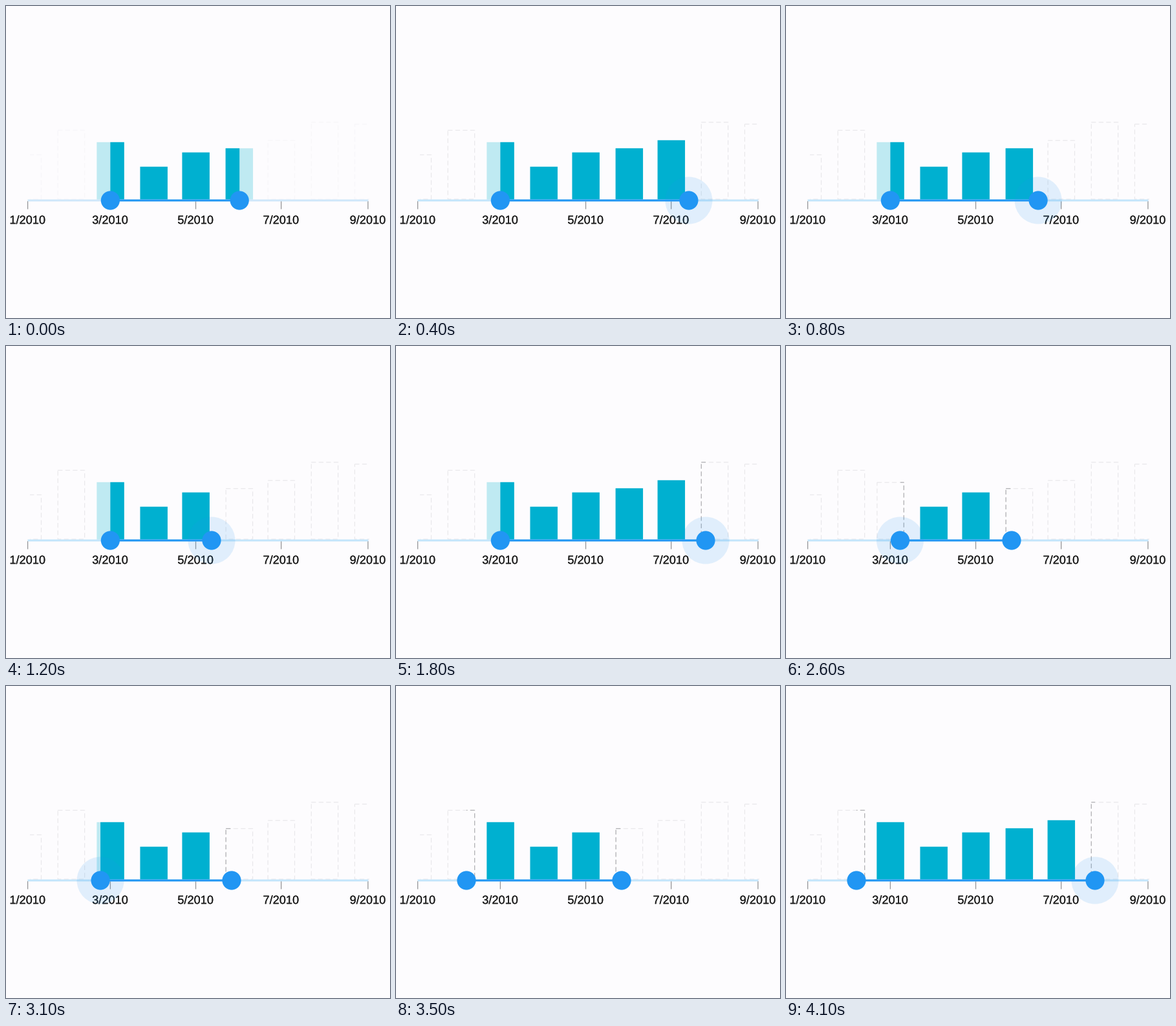
These frames come from a looping animation (594x483 px, 4200 ms). A matplotlib script:

```python
import matplotlib.pyplot as plt
from matplotlib.animation import FuncAnimation
from matplotlib.patches import Circle, Rectangle
from matplotlib.patheffects import withStroke

W, H, DPI = 594, 483, 64
PT = 72 / DPI  # points per pixel
FRAMES, STEP = 42, 100

BACK, BLUE, TEAL, PALE = "#fdfcfe", "#2196f3", "#00b0d0", "#bfeaf2"
TRACK, DASH, DARK_DASH = "#c3e5fb", "#e9e8eb", "#b0b0b3"
AXIS_Y, BASE_Y, BAR_W = 301, 299.7, 42.4

# Bars sit on the first day of each month
MONTH_DAYS = [0, 31, 59, 90, 120, 151, 181, 212, 243]
TOPS = [230, 192, 210.8, 248.8, 226.7, 220.3, 207.8, 179.6, 182.5]
CENTERS = [33.8 + 2.166 * day for day in MONTH_DAYS]

# Drags: first frame, last frame, end position, ease-out power
LEFT_START, RIGHT_START = 161.4, 361.2
LEFT_DRAGS = [(23, 26, 176.5, 1), (26, 29, 212, 1.6), (29, 34, 109, 2)]
RIGHT_DRAGS = [(0, 6, 472, 1.6), (7, 12, 318, 3.4), (12, 18, 479, 1.65),
               (18, 22, 349, 2.3), (36, 41, 478, 1.65)]


def position(frame, start, drags):
    x = start
    for first, last, end, power in drags:
        if frame <= first:
            break
        u = min(1, (frame - first) / (last - first))
        x += (end - x) * (1 - (1 - u) ** power)
    return x


fig = plt.figure(figsize=(W / DPI, H / DPI), dpi=DPI, facecolor=BACK)
ax = fig.add_axes([0, 0, 1, 1])
ax.set(xlim=(0, W), ylim=(H, 0))
ax.axis("off")


def block(color, z):
    return ax.add_patch(Rectangle((0, 0), 0, 0, fc=color, lw=0, zorder=z,
                                  snap=False))


def outline(x, top, color, z):
    return ax.add_patch(Rectangle(
        (x - BAR_W / 2 + 0.5, top + 0.4), BAR_W - 1, BASE_Y - top - 1,
        fill=False, ec=color, lw=1.2 * PT, ls=(0, (6, 3.6)),
        capstyle="butt", zorder=z, snap=False))


def line(x, y, color, width, z):
    return ax.plot(x, y, color=color, lw=width * PT, zorder=z, snap=False,
                   solid_capstyle="butt")[0]


def window(x0, x1):
    return Rectangle((x0, 0), x1 - x0, H, transform=ax.transData)


def dot(radius, z, alpha=1):
    return ax.add_patch(Circle((0, AXIS_Y), radius, fc=BLUE, lw=0,
                               alpha=alpha, zorder=z))


bars = []
for x, top in zip(CENTERS, TOPS):
    light = outline(x, top, DASH, 1)
    light.set_clip_path(window(37, 561.5))
    bars.append((x, top, light, outline(x, top, DARK_DASH, 2),
                 block(PALE, 3), block(TEAL, 4)))

for month, x in zip(range(1, 10, 2), CENTERS[::2]):
    line([x - 0.2, x - 0.2], [302, 314.5], "#969699", 1.3, 5)
    ax.text(x - 0.4, 337.2, f"{month}/2010", family="Liberation Sans",
            size=18.2 * PT, color="#1c1c1c", ha="center", va="baseline",
            zorder=5, path_effects=[withStroke(linewidth=0.2 * PT,
                                               foreground="#1c1c1c")])

track = line([33.5, 560.5], [AXIS_Y] * 2, TRACK, 3, 6)
chosen = line([], [], BLUE, 3, 7)
halo = dot(36.5, 8, 0.13)
left_thumb, right_thumb = dot(14.6, 9), dot(14.6, 9)


def draw(frame):
    lo = position(frame, LEFT_START, LEFT_DRAGS)
    hi = position(frame, RIGHT_START, RIGHT_DRAGS)
    # Outlines and track start out washed out
    first = frame == 0
    track.set_color("#cfe7fa" if first else TRACK)

    for x, top, light, dark, pale, teal in bars:
        x0, x1 = x - BAR_W / 2, x + BAR_W / 2
        filled = lo <= x <= hi
        light.set_edgecolor("#f7f6f9" if first else DASH)
        light.set_visible(not filled)
        dark.set_visible(not filled and x1 > lo and x0 < hi)
        dark.set_clip_path(window(lo, hi))
        pale.set_visible(filled)
        teal.set_visible(filled)
        a, b = max(x0, lo), min(x1, hi)
        pale.set_bounds(x0, top, BAR_W, BASE_Y - top)
        teal.set_bounds(a, top, max(0, b - a), BASE_Y - top)

    chosen.set_data([lo, hi], [AXIS_Y, AXIS_Y])
    left_thumb.center = lo, AXIS_Y
    right_thumb.center = hi, AXIS_Y
    left_held = 24 <= frame <= 34
    right_held = 1 <= frame <= 21 or frame >= 37
    halo.center = (lo if left_held else hi), AXIS_Y
    halo.set_visible(left_held or right_held)
    return []


anim = FuncAnimation(fig, draw, frames=FRAMES, interval=STEP,
                     init_func=lambda: draw(0), repeat=True, repeat_delay=0)
plt.show()
```
